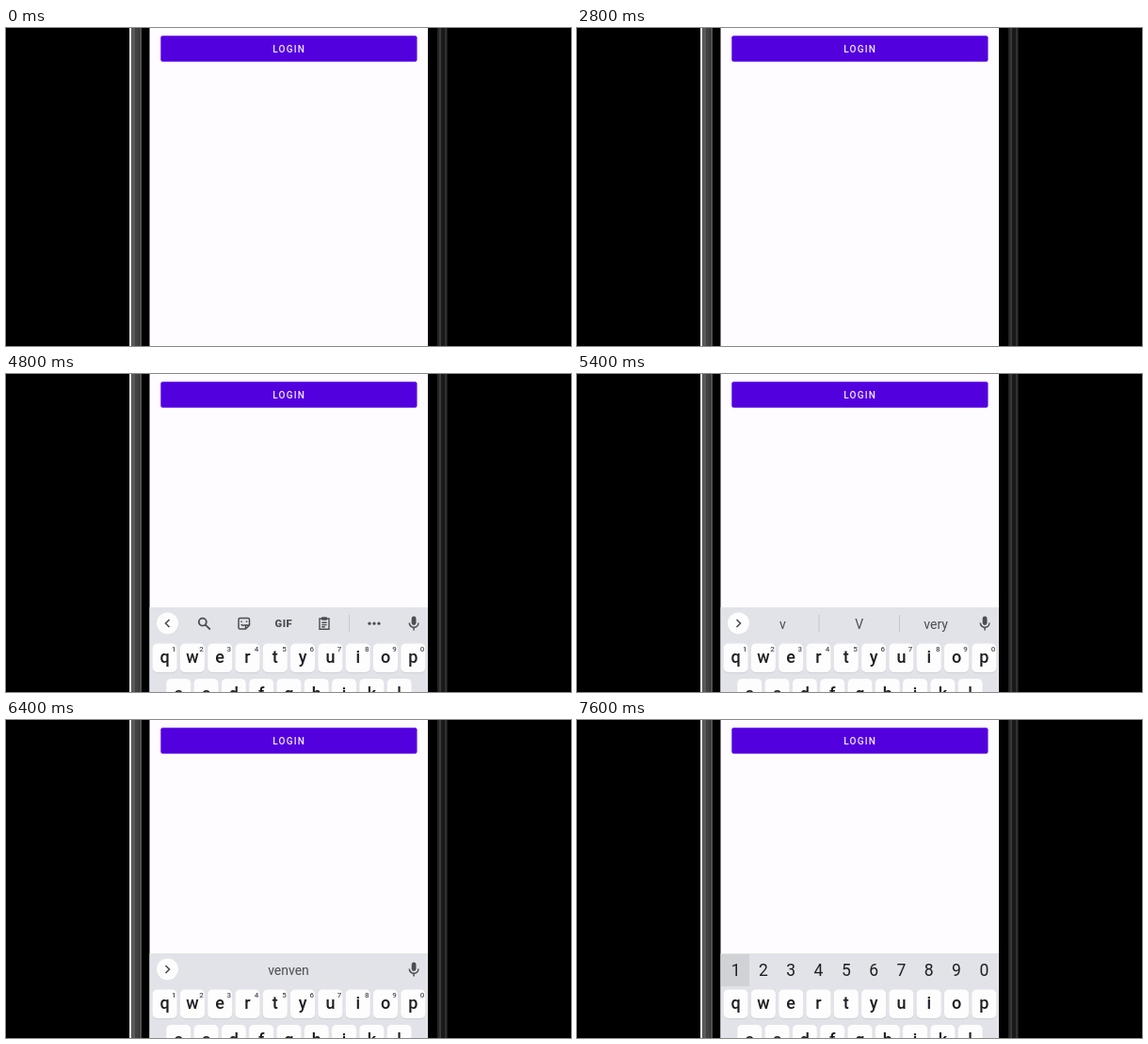
Recreate the animation shown at these times as an HTML page with a canvas. Size 600 px wide and 338 px high, loop 8 s.

```html
<!DOCTYPE html>
<html lang="en">
<head>
<meta charset="utf-8">
<title>Login keyboard</title>
<style>
  html, body { margin: 0; width: 100%; height: 100%; overflow: hidden; background: #000; }
  canvas { display: block; width: 600px; height: 338px; }
</style>
</head>
<body>
<canvas id="stage" width="600" height="338"></canvas>
<script>
const c = document.getElementById('stage').getContext('2d');
const LOOP = 8000, PITCH = 29.3, FIRST = 168.6;
const LEFT = 152.5, WIDTH = 295.5;
const INK = '#1e1f22', ICON = '#4b4d51', PANEL = '#e2e3e8', KEY = '#fdfdfe', SHADE = '#d2d4d9';

// Suggestion strip: start time and words
const strip = [
  [5400, ['v', 'V', 'very']],
  [5600, ['ve', 'Ve', 'Version']],
  [5800, ['ven', 'Ven', 'Venorra']],
  [6200, ['venv', 'Venv', 'Venvolna']],
  [6400, ['venven']],
  [7200, ['']]
];

function box(x, y, w, h, color, r = 0) {
  c.fillStyle = color;
  c.beginPath();
  c.roundRect(x, y, w, h, r);
  c.fill();
}

function disc(x, y, r, color) {
  c.fillStyle = color;
  c.beginPath();
  c.arc(x, y, r, 0, Math.PI * 2);
  c.fill();
}

function text(s, x, y, size, color = INK, weight = 400) {
  c.font = `${weight} ${size}px Roboto, sans-serif`;
  c.textAlign = 'center';
  c.fillStyle = color;
  c.fillText(s, x, y);
}

function stroke(d, width = 1.6, color = ICON) {
  c.strokeStyle = color;
  c.lineWidth = width;
  c.stroke(new Path2D(d));
}

function bezel() {
  const left = [[131, 2, '#e8e8e8'], [133, 1, '#555'], [134, 3, '#5a5a5a'], [137, 4, '#414141'],
    [141, 1, '#333'], [142, 2, '#505050']];
  const right = [[458, 2, '#252525'], [460, 2, '#393939'], [462, 4, '#191919'],
    [466, 2, '#303030'], [468, 1, '#191919']];
  for (const [x, w, color] of [...left, ...right]) box(x, 0, w, 338, color);
}

function screen() {
  box(LEFT, 0, WIDTH, 338, '#fefcff');
  box(164.3, 8.2, 272.2, 27.6, '#5300df', 2);
  c.letterSpacing = '1.25px';
  text('LOGIN', 300.7, 26, 10, '#f2eaff', 500);
  c.letterSpacing = '0px';
}

function key(x, y, label, baseline) {
  box(x - 13, y + 1, 26, 30.7, SHADE, 5);
  box(x - 13, y, 26, 30.5, KEY, 5);
  text(label, x, baseline, 18, INK, 500);
}

function keys(hints) {
  [...'qwertyuiop'].forEach((ch, i) => {
    const x = FIRST + i * PITCH;
    key(x, 286.5, ch, 307);
    if (hints) text((i + 1) % 10, x + 9.6, 295, 8, ICON, 500);
  });
  [...'asdfghjkl'].forEach((ch, i) => key(FIRST + (i + .5) * PITCH, 324, ch, 346));
}

function chevron(dir) {
  disc(171.5, 265.5, 11.6, SHADE);
  disc(171.5, 265, 11.5, KEY);
  const x = 171.5 - dir * 2, tip = 171.5 + dir * 2;
  stroke(`M${x} 261 L${tip} 265 L${x} 269`, 1.6);
}

function mic() {
  box(430.7, 257.5, 4.8, 9.5, ICON, 2.4);
  stroke('M428.3 264.5 a4.8 4.8 0 0 0 9.6 0 M433.1 269.3 V272.5', 1.5);
}

function divider(x) {
  box(x, 256, 1, 18, '#c6c8cc');
}

function toolbar() {
  chevron(-1);
  stroke('M212.8 263.6 a4 4 0 1 1 -8 0 a4 4 0 1 1 8 0 M211.8 266.6 L216.8 271.5', 1.8);
  stroke('M248.5 259.5 h8.5 q1.5 0 1.5 1.5 v6 l-4 4 h-6 q-1.5 0 -1.5 -1.5 v-8.5 q0 -1.5 1.5 -1.5 M258.5 267 h-4 v4', 1.5);
  stroke('M250 262.5 v1.5 M255.5 262.5 v1.5 M249.7 266 q2 2.4 4.5 .5', 1.4);
  c.letterSpacing = '.5px';
  text('GIF', 294.9, 269, 11.2, ICON, 900);
  c.letterSpacing = '0px';
  stroke('M333 260 h10 v11.3 h-10 z M335.3 264.3 h5.4 M335.3 266.6 h5.4 M335.3 268.8 h3.5', 1.4);
  box(335, 258.3, 6, 3.4, ICON, 1);
  divider(364);
  for (const x of [386, 391, 396]) disc(x, 265.2, 1.6, ICON);
  mic();
}

function suggestions(words) {
  chevron(1);
  mic();
  if (words.length === 1) return text(words[0], 300, 271, 14, ICON);
  words.forEach((w, i) => text(w, 218.5 + i * 81.3, 271, 14, ICON));
  divider(256.5);
  divider(342);
}

function digits(pressed) {
  if (pressed) box(153, 249, 30, 34, '#d0d2d6');
  for (let i = 0; i < 10; i++) text((i + 1) % 10, FIRST + i * PITCH, 272.3, 17.5);
}

function popup(x, label) {
  box(x - 14, 249, 28, 68, SHADE, 6);
  box(x - 13.5, 248, 27, 68, KEY, 6);
  text(label, x, 271, 20);
}

function keyboard(t) {
  box(LEFT, 248, WIDTH, 90, PANEL);
  const numeric = t >= 7400;
  keys(!numeric);
  if (numeric) digits(t >= 7600);
  else if (t < strip[0][0]) toolbar();
  else suggestions(strip.filter(s => s[0] <= t).pop()[1]);
  if (t >= 5600 && t < 5800) popup(FIRST + 2 * PITCH, 'e');
}

function draw(t) {
  box(0, 0, 600, 338, '#000');
  bezel();
  screen();
  if (t >= 4800) keyboard(t);
}

const start = performance.now();
function tick() {
  draw((performance.now() - start) % LOOP);
  requestAnimationFrame(tick);
}
tick();
</script>
</body>
</html>
```
